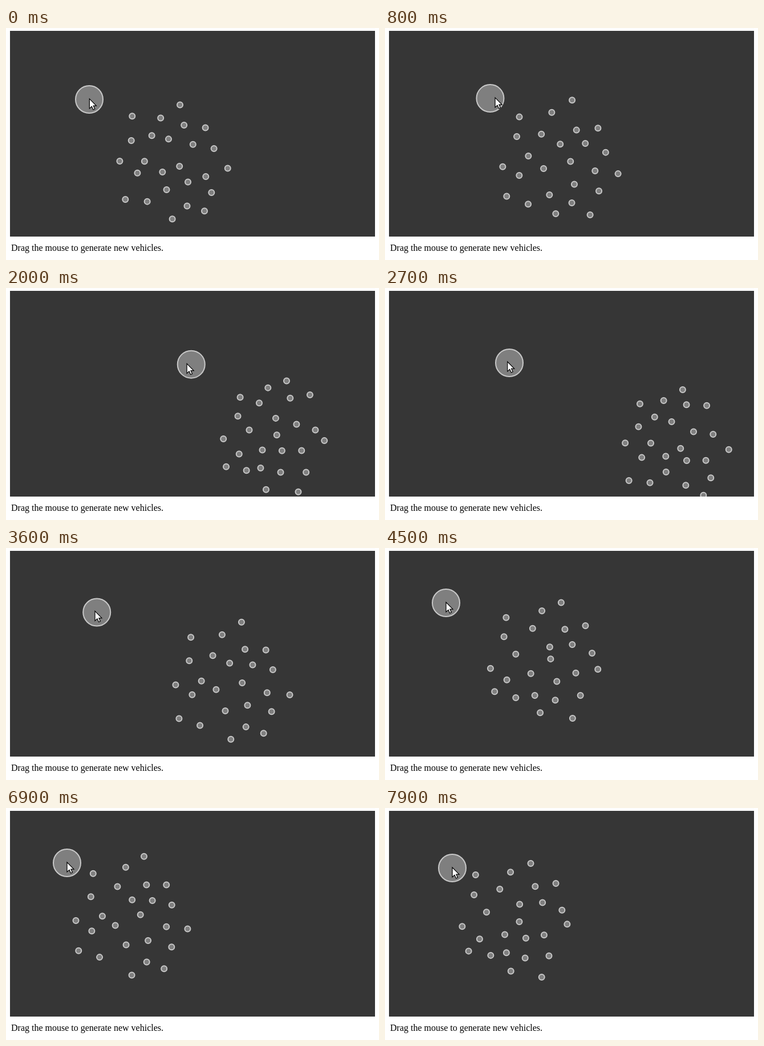
An HTML page with a canvas that plays this animation: 654 by 406 pixels, repeating every 8 s.

```html
<!DOCTYPE html>
<html lang="en">
<head>
<meta charset="utf-8">
<title>Vehicles</title>
<style>
  html, body { margin: 0; width: 100%; height: 100%; overflow: hidden; background: #fff; }
  canvas { position: absolute; left: 7px; top: 5px; }
  p { position: absolute; left: 9px; top: 376px; margin: 0; white-space: nowrap;
      font: 16px/18px "Liberation Serif", "Times New Roman", serif; color: #000; }
</style>
</head>
<body>
<canvas width="640" height="360"></canvas>
<p>Drag the mouse to generate new vehicles.</p>
<script>
const ctx = document.querySelector('canvas').getContext('2d');
const LOOP = 8000;
const COUNT = 25;
const GOLDEN_ANGLE = Math.PI * (3 - Math.sqrt(5));

// Turning points as [ms, x, y]; the swarm trails behind the mouse.
const MOUSE = [
  [0, 146, 125], [600, 150, 124], [1500, 305, 120], [1900, 340, 134], [2700, 218, 131],
  [4400, 107, 96], [7000, 107, 96], [7900, 118, 105]
];
const SWARM = [
  [0, 289, 235], [900, 305, 235], [2400, 525, 268], [2700, 505, 274],
  [4500, 279, 200], [5800, 208, 189], [7900, 227, 197]
];
const ARROW = new Path2D('M0 0V17L4 13.3L6.6 19L9.4 17.8L6.9 12.2H12Z');

const mix = (a, b, u) => a + (b - a) * u;

function follow(path, t) {
  const time = Math.min(t, path[path.length - 1][0]);
  const next = path.findIndex(key => key[0] >= time && key[0] > 0);
  const [t0, x0, y0] = path[next - 1], [t1, x1, y1] = path[next];
  const u = (time - t0) / (t1 - t0);
  return [mix(x0, x1, u), mix(y0, y1, u)];
}

// Evenly spread like sunflower seeds, each vehicle jostling around its place.
function vehicle(i, t) {
  const [x, y] = follow(SWARM, t);
  const radius = 21.5 * Math.sqrt(i + 0.5);
  const angle = i * GOLDEN_ANGLE;
  const sway = t / (450 + 20 * (i % 7));
  return [
    x + radius * Math.cos(angle) + 7 * Math.sin(sway + i * 2.4),
    y + radius * Math.sin(angle) + 7 * Math.cos(sway + i * 1.7)
  ];
}

function disc([x, y], radius) {
  ctx.beginPath();
  ctx.arc(x, y, radius, 0, 2 * Math.PI);
  ctx.fillStyle = '#7f7f7f';
  ctx.strokeStyle = '#c8c8c8';
  ctx.lineWidth = 2;
  ctx.fill();
  ctx.stroke();
}

function pointer([x, y]) {
  ctx.save();
  ctx.translate(x, y - 1);
  ctx.fillStyle = '#fff';
  ctx.strokeStyle = '#000';
  ctx.lineWidth = 1.2;
  ctx.fill(ARROW);
  ctx.stroke(ARROW);
  ctx.restore();
}

function draw(t) {
  ctx.setTransform(1, 0, 0, 1, -7, -5);
  ctx.fillStyle = '#363636';
  ctx.fillRect(7, 5, 640, 360);
  disc(follow(MOUSE, t), 24);
  for (let i = 0; i < COUNT; i++) disc(vehicle(i, t), 5);
  pointer(follow(MOUSE, t + 50));
}

const began = performance.now();
function tick() {
  let step = Math.floor((performance.now() - began) % LOOP / 100);
  // Later on, every third step is skipped.
  if (step > 24 && step % 3 === 2) step--;
  draw(step * 100);
  requestAnimationFrame(tick);
}
tick();
</script>
</body>
</html>
```
